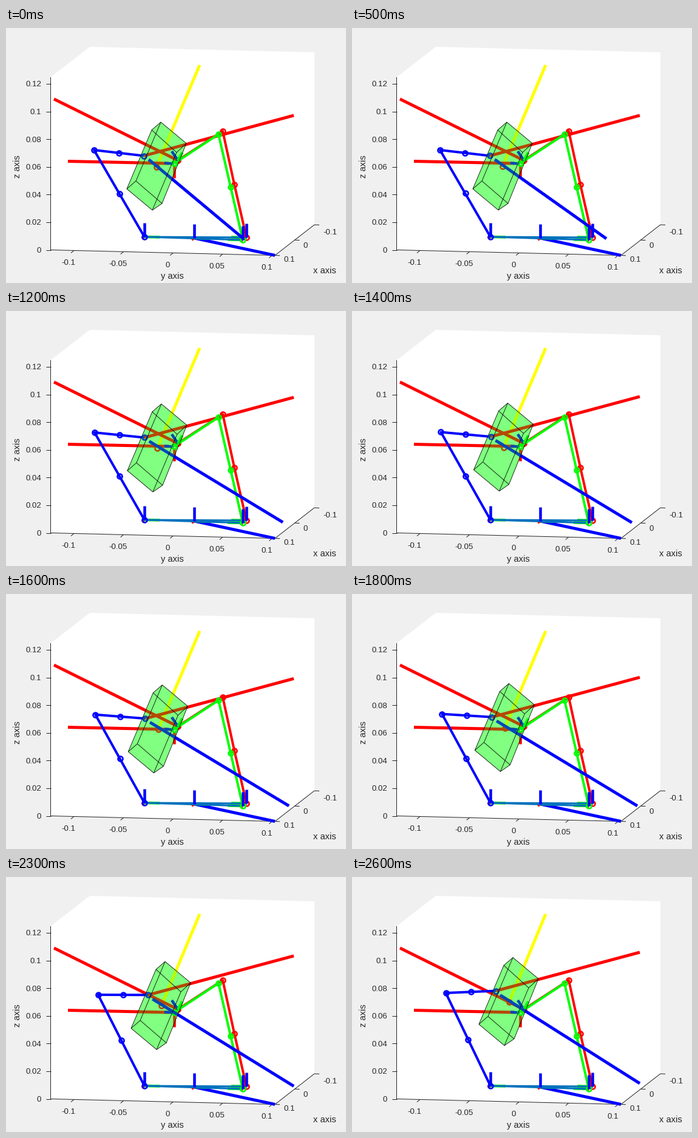
Animation, 560 px wide and 420 px high, one loop 2700 ms. Source, as a matplotlib script:

```python
import numpy as np
import matplotlib.pyplot as plt
from matplotlib.animation import FuncAnimation
from matplotlib.patches import Polygon

W, H, DPI = 560, 420, 100
FRAMES, HOLD, STEPS = 27, 4, 22
PT = 72 / DPI
RED, GREEN, BLUE = (1, 0, 0), (0, 1, 0), (0, 0, 1)
YELLOW, TEAL, INK = (1, 1, 0), (0, 0.447, 0.741), "#262626"

plt.rcParams["font.family"] = "Liberation Sans"
fig = plt.figure(figsize=(W / DPI, H / DPI), dpi=DPI, facecolor="#f0f0f0")
ax = fig.add_axes([0, 0, 1, 1])
ax.set_xlim(0, W)
ax.set_ylim(H, 0)
ax.axis("off")


def line(pts, color, width, z):
    xs, ys = zip(*pts)
    return ax.plot(xs, ys, color=color, lw=width * PT, zorder=z,
                   solid_capstyle="butt", solid_joinstyle="round")[0]


def rings(pts, color, z, size=8, width=2.6):
    xs, ys = zip(*pts)
    return ax.plot(xs, ys, "o", mfc="none", mec=color, ms=size * PT,
                   mew=width * PT, zorder=z)[0]


def label(x, y, s, size=13.3, ha="center", rotation=0):
    ax.text(x, y, s, fontsize=size * PT, color=INK, ha=ha,
            va="center_baseline" if not rotation else "center",
            rotation=rotation)


def draw_axes():
    room = [(73.5, 81), (138, 31), (508, 40), (508, 324), (443, 374.5), (73.5, 365.5)]
    ax.add_patch(Polygon(room, fc="white", ec="none", zorder=0))
    line([room[0], room[5], room[4], room[3]], INK, 1, 1)
    for i in range(7):
        y = 365.5 - 45.6 * i
        line([(66, y), (73.5, y)], INK, 1, 1)
        label(58, y, f"{0.02 * i:.2g}", ha="right")
    for i, s in enumerate(["-0.1", "-0.05", "0", "0.05", "0.1"]):
        x, y = 112 + 81.6 * i, 366.5 + 2 * i
        line([(x, y), (x - 5, y + 4)], INK, 1, 1)
        label(x - 9, y + 18.5, s)
    for i, s in enumerate(["0.1", "0", "-0.1"]):
        x, y = 443 + 32.5 * i, 374.5 - 25.2 * i
        line([(x, y), (x + 8, y + 0.3)], INK, 1, 1)
        label(x + 14, y + 6 + 2.5 * i, s, ha="left")
    label(274, 408, "y axis", 14.6)
    label(525, 398, "x axis", 14.6)
    label(19, 228, "z axis", 14.6, rotation=90)


def draw_base():
    left, mid, front, back = (228, 344), (310, 346), (390, 349), (396, 345)
    line([mid, (443, 374.5)], BLUE, 5, 4)
    for (x, y), side in ((left, 1), (mid, 1), (back, -1), (front, -1)):
        line([(x, y), (x - 4, y + 3)], RED, 4, 4)
        line([(x, y), (x + 25 * side, y + 0.5 * side)], GREEN, 4.5, 4)
        line([(x, y), (x, y - 23)], BLUE, 4.5, 9)
    line([back, left, front], TEAL, 3, 5)
    rings([left], BLUE, 6)


def draw_fixed_arms():
    red = [(396, 345), (376, 257.5), (357, 170), (283, 218)]
    green = [(390, 349), (370, 262), (350, 175), (277, 223)]
    for pts, color, z in ((red, RED, 6), (green, GREEN, 7)):
        line(pts, color, 4, z)
        rings(pts, color, z)
    line([(79, 117), (283, 218)], RED, 5, 5)
    line([(102, 219.5), (268, 223)], RED, 5, 5)
    line([(261, 222.5), (276, 223.5)], BLUE, 4.5, 6)
    line([(283, 218), (273, 203)], BLUE, 4.5, 7)
    line([(283, 218), (290.5, 205)], GREEN, 4.5, 7)
    line([(277, 226), (277, 247)], RED, 4.5, 6)


draw_axes()
draw_base()
draw_fixed_arms()

TOP = [(240, 168), (255, 155), (297, 190), (281, 205)]
BOTTOM = [(199, 265), (214, 252), (257, 289), (241, 300)]
OUTLINE = np.array([TOP[0], TOP[1], TOP[2], BOTTOM[2], BOTTOM[3], BOTTOM[0]])
EDGES = [np.array(p) for p in (TOP + TOP[:1], BOTTOM + BOTTOM[:1], *zip(TOP, BOTTOM))]

# Two translucent layers: the lines inside the box lie between them.
layers = [Polygon(OUTLINE, fc=(0, 1, 0, 0.29), ec="none", zorder=z) for z in (2, 8)]
for layer in layers:
    ax.add_patch(layer)
edges = [line(e, "black", 0.8, 8.5) for e in EDGES]

arm = line([(0, 0)], BLUE, 4, 6)
arm_rings = rings([(0, 0)], BLUE, 6)
hub = rings([(0, 0)], RED, 5)
axis_red = line([(0, 0)], RED, 5, 5)
axis_yellow = line([(0, 0)], YELLOW, 5, 4)
axis_blue = line([(0, 0)], BLUE, 5, 7.5)

# Where the blue axis leaves the plot box: first the floor, then the side wall.
EXIT_STEP = [0, 1, 2, 3, 4, 8, 12, 16, 19, 22]
EXIT_X = [390, 419, 433, 440, 444, 456, 466, 474, 474, 474]
EXIT_Y = [346, 347, 347.5, 348, 348, 348, 349, 349, 344.5, 340]


def moved(point, delta, s):
    return np.array(point) + s * np.array(delta)


def put(artist, *pts):
    artist.set_data(*zip(*pts))


def update(frame):
    n = max(0, frame - HOLD)
    s = (n / STEPS) ** 2.4
    shift = s * np.array([10, -22.4])
    for layer in layers:
        layer.set_xy(OUTLINE + shift)
    for artist, e in zip(edges, EDGES):
        put(artist, *(e + shift))

    elbow = moved((145, 201), (9.5, -10), s)
    grip = moved((227, 210.5), (10, -23), s)
    centre = moved((248, 228.5), (11, -23), s)
    foot = np.array([228, 344])
    put(arm, foot, elbow, grip)
    put(arm_rings, (foot + elbow) / 2, elbow, (elbow + grip) / 2, grip)
    put(hub, centre)
    put(axis_red, grip, moved((474, 144), (0, -20), s))
    put(axis_yellow, centre, (319, 61))
    end = [np.interp(n, EXIT_STEP, v) for v in (EXIT_X, EXIT_Y)]
    put(axis_blue, moved((235, 216.5), (9, -22), s), end)
    return []


anim = FuncAnimation(fig, update, frames=FRAMES, interval=100,
                     init_func=lambda: update(0), repeat=True, repeat_delay=0)
plt.show()
```
